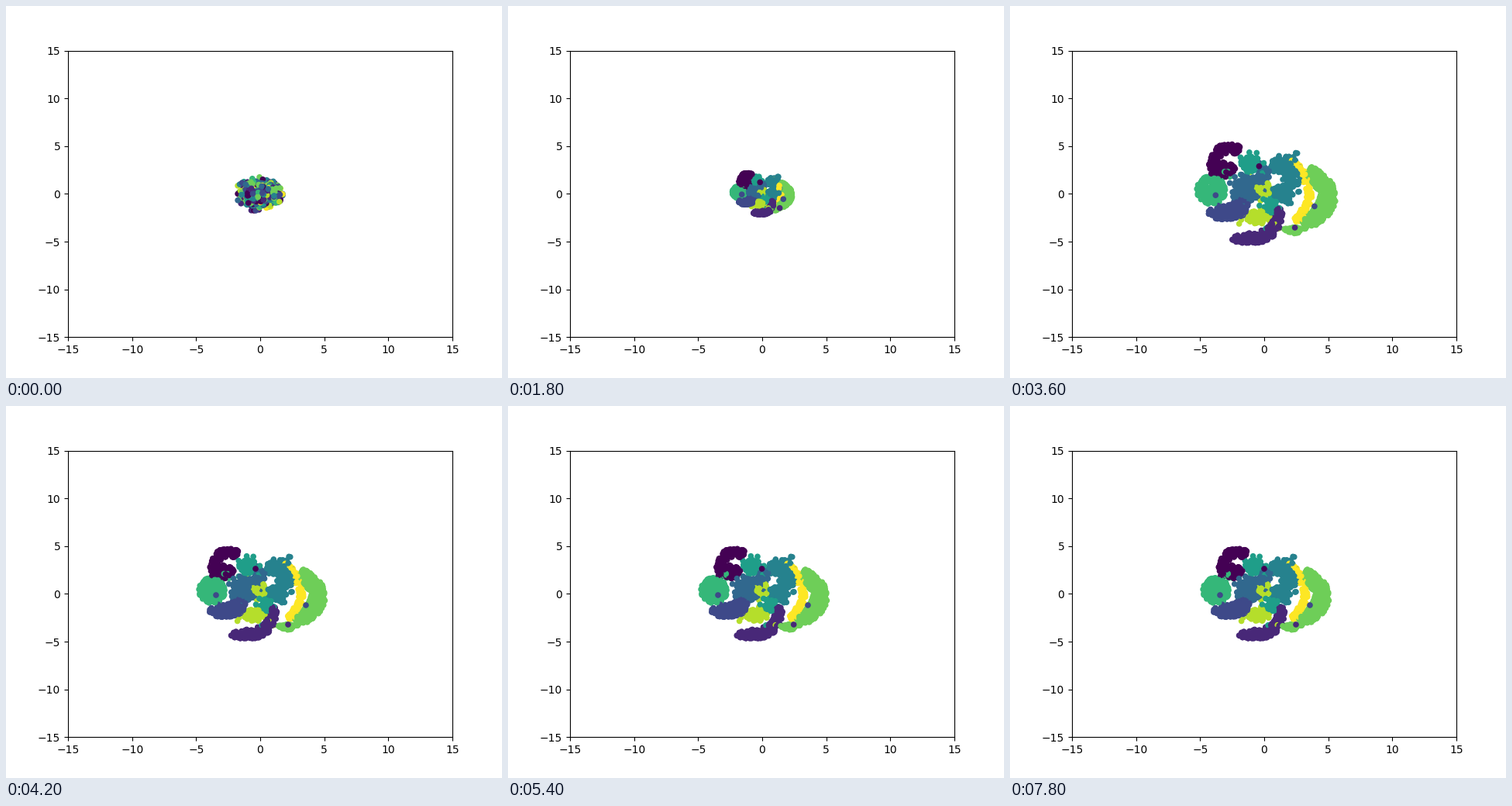
A matplotlib script that plays this animation: 640 by 480 pixels, repeating every 8 s.

```python
import numpy as np
import matplotlib.pyplot as plt
from matplotlib.animation import FuncAnimation

rng = np.random.default_rng(7)
CENTRE = np.array([328.0, 242.4])
UNIT = np.array([496 / 30, -369.6 / 30])  # pixels per data unit
DENSITY = 0.21  # points per square pixel

# Settled class shapes: centre, radii and, for arcs, hole and angle range
SHAPES = {
    0: [(293, 208, 24, 25, 0.55, 150, 310), (287, 214, 13, 9)],
    1: [(326, 264, 29, 36, 0.6, -10, 85), (315, 295, 20, 7)],
    2: [(284, 264, 22, 9), (300, 258, 10, 9)],
    3: [(310, 236, 16, 15), (328, 220, 8, 10)],
    4: [(351, 207, 15, 10), (362, 222, 10, 12), (350, 242, 12, 10)],
    5: [(315, 207, 12, 9), (338, 256, 8, 10)],
    6: [(266, 238, 17, 17), (285, 219, 7, 4)],
    7: [(362, 246, 50, 39, 0.6, -65, 75), (361, 285, 11, 4)],
    8: [(321, 270, 14, 8), (327, 237, 9, 9)],
    9: [(348, 242, 36, 42, 0.78, -70, 60)],
}
STRAYS = [(0, 328, 210), (1, 369, 282), (2, 271, 244), (2, 387, 257)]
MIXED = [3, 4, 5, 8]  # classes that mingle in the middle
# Horizontal offsets in pixels before settling, and while compact
DRIFT = {0: -6, 1: -5, 3: -2, 5: -3}
COMPACT_SHIFT = {1: 6, 4: 3, 6: -2}


def fill(cx, cy, rx, ry, hole=0, first=0, last=360):
    """Spread points evenly over an ellipse or a sector of its ring."""
    area = np.pi * rx * ry * (1 - hole**2) * (last - first) / 360
    count = int(area * DENSITY)
    radius = np.sqrt(rng.uniform(hole**2, 1, count))
    angle = np.radians(rng.uniform(first, last, count))
    return np.c_[cx + rx * radius * np.cos(angle),
                 cy + ry * radius * np.sin(angle)]


def shift(table):
    dx = np.array([table.get(k, 0) for k in labels], float)
    return np.c_[dx, np.zeros_like(dx)]


points, labels = [], []
for label, shapes in SHAPES.items():
    for shape in shapes:
        points.append(fill(*shape))
        labels += [label] * len(points[-1])
order = rng.permutation(len(labels))
points = np.vstack(points)[order]
labels = np.array(labels)[order]
loose_ends = np.isin(labels, MIXED) & (rng.random(len(labels)) < 0.2)
points[loose_ends] += rng.normal(0, 7, (loose_ends.sum(), 2))
points = np.vstack([points, [s[1:] for s in STRAYS]])
labels = np.r_[labels, [s[0] for s in STRAYS]]

# Poses, as pixel offsets from the centre
settled = points - CENTRE
loose = settled + shift(DRIFT)
peak = 1.1 * loose
compact = 0.42 * peak + shift(COMPACT_SHIFT)
start = np.clip(rng.normal(0, 0.54, points.shape), -1.75, 1.75) * np.abs(UNIT)


def blend(a, b, t):
    return a + (b - a) * t


def pose(step):
    if step < 11:
        gather = 1 - np.exp(-step) * np.cos(0.8 * step)
        return blend(start, compact, gather)
    if step < 13:
        return blend(compact, peak, 0.75 if step == 11 else 1)
    if step < 15:
        return blend(peak, loose, 0.6 if step == 13 else 1)
    return blend(loose, settled, 1 - 0.5 ** (step - 14))


fig, ax = plt.subplots(figsize=(6.4, 4.8), dpi=100)
ax.set_xlim(-15, 15)
ax.set_ylim(-15, 15)
dots = ax.scatter(*(start / UNIT).T, s=20, c=labels, cmap="viridis")


def update(frame):
    dots.set_offsets(pose(frame // 3) / UNIT)
    return (dots,)


anim = FuncAnimation(fig, update, frames=80, interval=100, repeat=True,
                     repeat_delay=0)
plt.show()
```
